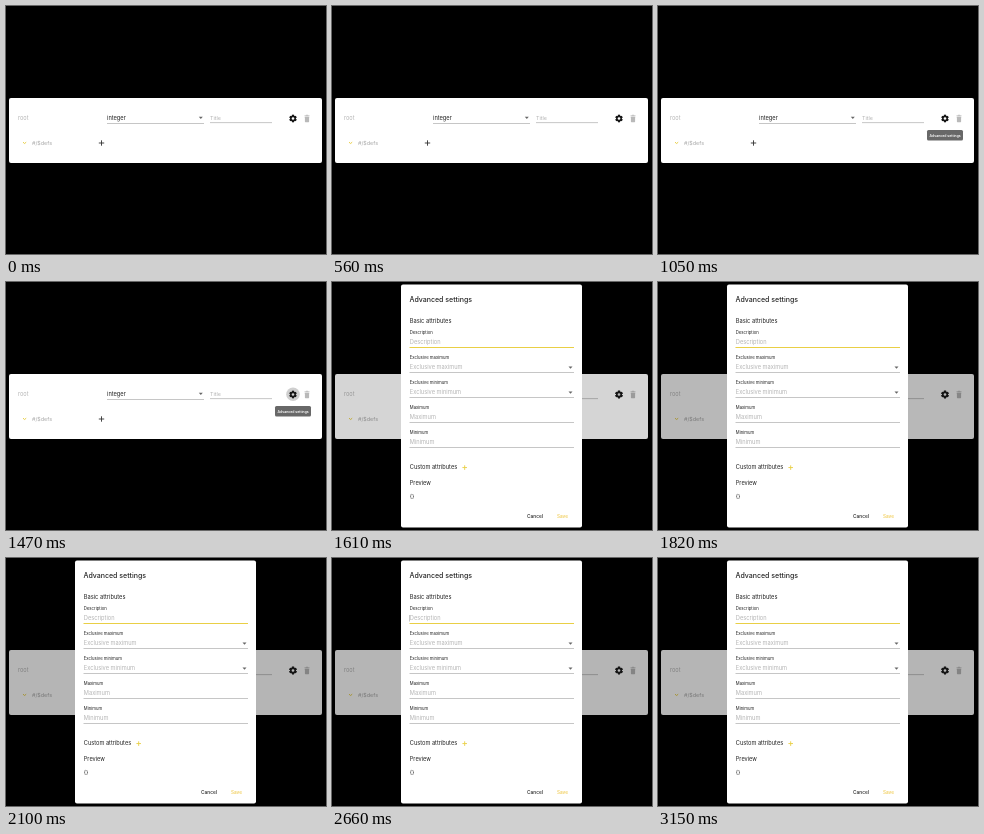
An HTML page with a canvas that plays this animation: 320x248 px, repeating every 3.36 s.

```html
<!DOCTYPE html>
<html lang="en">
<head>
<meta charset="utf-8">
<title>Advanced settings</title>
<style>
  html, body { margin: 0; width: 100%; height: 100%; overflow: hidden; background: #000; }
  canvas { display: block; width: 320px; height: 248px; }
</style>
</head>
<body>
<canvas id="stage"></canvas>
<script>
const W = 320, H = 248, LOOP = 3360, STEP = 70;
const TOOLTIP_AT = 1050, HOVER_AT = 1470, DIALOG_AT = 1610;
const CARET_ON = 2520, CARET_OFF = 3010;
const INK = '#222', HINT = '#b4b4b4', LINE = '#b8b8b8', ACCENT = '#e9cf45';

const canvas = document.getElementById('stage');
const ctx = canvas.getContext('2d');
const scale = window.devicePixelRatio || 1;
canvas.width = W * scale;
canvas.height = H * scale;
ctx.scale(scale, scale);

function box(x, y, w, h, r, color) {
  ctx.fillStyle = color;
  ctx.beginPath();
  ctx.roundRect(x, y, w, h, r);
  ctx.fill();
}

function rect(x, y, w, h, color) {
  ctx.fillStyle = color;
  ctx.fillRect(x, y, w, h);
}

function disc(x, y, r, color) {
  ctx.fillStyle = color;
  ctx.beginPath();
  ctx.arc(x, y, r, 0, Math.PI * 2);
  ctx.fill();
}

function label(str, x, y, size, color = INK, weight = 400) {
  ctx.font = `${weight} ${size}px Inter, sans-serif`;
  ctx.fillStyle = color;
  ctx.fillText(str, x, y);
}

function arrow(x, y, color = '#666') {
  ctx.fillStyle = color;
  ctx.beginPath();
  ctx.moveTo(x - 2, y - 1);
  ctx.lineTo(x + 2, y - 1);
  ctx.lineTo(x, y + 1.2);
  ctx.fill();
}

function plus(x, y, arm, color) {
  rect(x - arm, y - 0.45, arm * 2, 0.9, color);
  rect(x - 0.45, y - arm, 0.9, arm * 2, color);
}

function gear(x, y, hole) {
  ctx.save();
  ctx.translate(x, y);
  for (let i = 0; i < 6; i++) {
    rect(-1.1, -3.8, 2.2, 2.4, '#161616');
    ctx.rotate(Math.PI / 3);
  }
  ctx.restore();
  disc(x, y, 2.9, '#161616');
  disc(x, y, 1.3, hole);
}

function trash(x, y) {
  const c = '#b9b9b9';
  rect(x - 2.5, y - 3.2, 5, 0.9, c);
  rect(x - 1.1, y - 3.8, 2.2, 0.8, c);
  box(x - 2.1, y - 1.9, 4.2, 5.5, 0.6, c);
}

function drawCard(t) {
  box(3, 92, 313, 65, 2, '#fff');
  label('root', 12, 114, 5.6, HINT);
  label('integer', 101, 114.3, 5.7, INK);
  arrow(194.8, 111.8);
  rect(101, 117, 97, 0.8, LINE);
  label('Title', 204, 114, 5.4, HINT);
  rect(204, 116.3, 62, 0.8, LINE);

  ctx.strokeStyle = ACCENT;
  ctx.lineWidth = 1;
  ctx.beginPath();
  ctx.moveTo(17, 136.2);
  ctx.lineTo(18.6, 137.5);
  ctx.lineTo(20.2, 136.2);
  ctx.stroke();
  label('#/$defs', 26, 138.6, 5.4, '#a6a6a6');
  plus(95.5, 137, 2.7, '#333');

  const hover = t >= HOVER_AT && t < DIALOG_AT;
  if (hover) disc(287, 112.3, 6.8, '#cfcfcf');
  gear(287, 112.5, hover ? '#cfcfcf' : '#fff');
  trash(301, 112.6);
  if (t >= TOOLTIP_AT && t < DIALOG_AT) {
    box(269, 124, 36, 10.5, 1.5, '#686868');
    label('Advanced settings', 271.6, 130.6, 3.45, '#fff', 600);
  }
}

function drawShade(t) {
  const n = Math.floor((t - DIALOG_AT) / STEP);
  const alpha = 0.29 - 0.125 * Math.pow(0.44, n);
  rect(0, 0, W, H, `rgba(0,0,0,${alpha})`);
}

const fields = [
  ['Description', false],
  ['Exclusive maximum', true],
  ['Exclusive minimum', true],
  ['Maximum', false],
  ['Minimum', false]
];

function drawDialog(t) {
  box(69, 2.5, 181, 243, 2, '#fff');
  label('Advanced settings', 77.5, 19.9, 7, INK, 500);
  label('Basic attributes', 77.8, 40.8, 5.7, INK);

  fields.forEach(([name, select], i) => {
    const y = 65 + 25 * i;
    label(name, 77.8, y - 12.7, 4.25, INK);
    label(name, 77.8, y - 2.6, 5.7, HINT);
    rect(77.5, y, 164.5, i ? 0.8 : 1, i ? LINE : ACCENT);
    if (select) arrow(238.5, y - 4.5);
  });
  if (t >= CARET_ON && t < CARET_OFF) rect(77.5, 57, 0.5, 6.5, '#888');

  label('Custom attributes', 77.8, 187.4, 5.65, INK);
  plus(132.7, 185.6, 2.3, ACCENT);
  label('Preview', 77.8, 203.3, 5.6, INK);
  label('{}', 77.8, 215.7, 5.4, INK);
  label('Cancel', 195, 235.8, 4.8, INK, 500);
  label('Save', 225, 235.8, 4.7, '#efc94b', 500);
}

function draw(t) {
  rect(0, 0, W, H, '#000');
  drawCard(t);
  if (t >= DIALOG_AT) {
    drawShade(t);
    gear(287, 112.5, '#b8b8b8');
    drawDialog(t);
  }
}

const start = performance.now();
function tick() {
  draw((performance.now() - start) % LOOP);
  requestAnimationFrame(tick);
}
tick();
</script>
</body>
</html>
```
